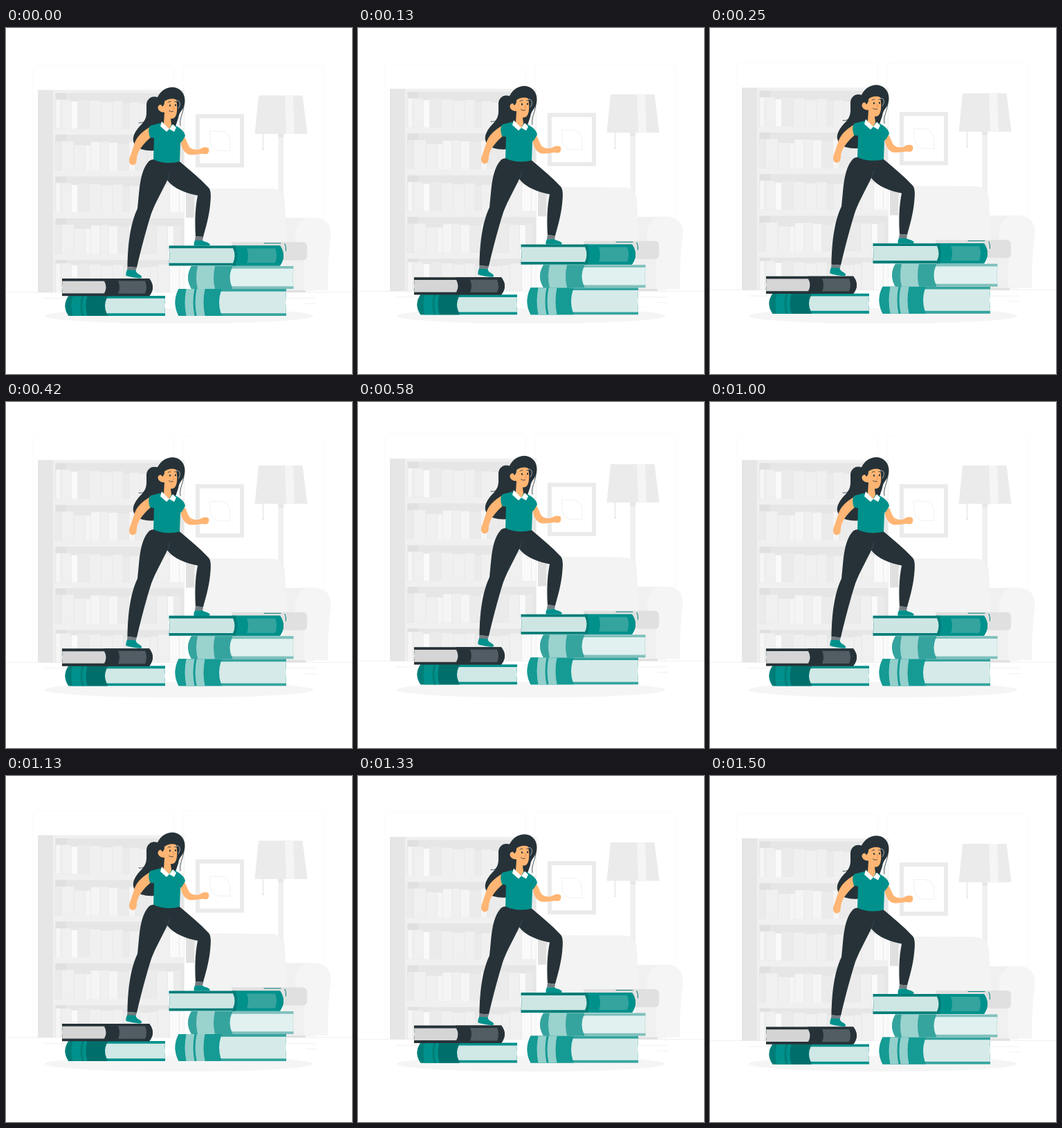
Write an HTML page that moves like this. It is 500 px wide and 500 px high and loops after 1540 ms.

```html
<!DOCTYPE html>
<html lang="en">
<head>
<meta charset="utf-8">
<title>Climbing the books</title>
<style>
html, body { margin: 0; width: 100%; height: 100%; overflow: hidden; background: #fff; }
svg { display: block; width: 100vw; height: 100vh; }
.line { fill: none; stroke-linecap: round; }
</style>
</head>
<body>
<svg viewBox="0 0 500 500">
  <ellipse cx="250" cy="416" rx="194" ry="11.3" fill="#f5f5f5"/>
  <g id="scene">
    <!-- wall and floor -->
    <g class="line" stroke="#fafafa">
      <rect x="39" y="54" width="203.5" height="328" rx="4"/>
      <rect x="255" y="54" width="203.5" height="328" rx="4"/>
      <path stroke="#f0f0f0" d="M0 382H500M56 390.5H84M408 390.5H446M433 398.5H448"/>
    </g>

    <g id="bookcase"></g>

    <!-- picture -->
    <path fill="#fff" stroke="#ebebeb" stroke-width="6" d="M277 127.5H341V198.5H277z"/>
    <path class="line" stroke="#f0f0f0" d="M295 149H309A15 15 0 0 1 324 164V177.5H310A15 15 0 0 1 295 162z"/>

    <!-- lamp -->
    <path fill="#f0f0f0" d="M393.5 153H401V280H393.5z"/>
    <path fill="#e6e6e6" d="M393.5 153H401V158H393.5z"/>
    <path fill="#ebebeb" d="M365 97.5H428.5L435.5 153H359.5z"/>
    <path fill="#f5f5f5" d="M403 97.5H415L417 153H405z"/>
    <path class="line" stroke="#e0e0e0" d="M371.5 153V174"/>
    <circle cx="371.5" cy="175" r="1.2" fill="#e0e0e0"/>

    <!-- sofa -->
    <path fill="#e0e0e0" d="M260 236H276V274H260z"/>
    <path fill="#f0f0f0" d="M400 274.5H445V380H400z"/>
    <path fill="#f3f3f3" d="M272 330V250Q273 231.5 292 231.5L384 232Q401 233 403 250L407 330z"/>
    <path fill="#f5f5f5" d="M418 310C416 286 424 274 444 274C462 274 471 285 469.5 301C466 327 465 350 465 379H431V310z"/>
    <path fill="#e0e0e0" d="M326 309.5H429Q435 310 435 316V329Q435 335 429 335.5H326zM400 379H433V382H400z"/>

    <g id="stacks"></g>
    <path class="line" stroke="#007d78" d="M373 311H397M403 312Q405 316 404.5 322"/>

    <!-- woman -->
    <g fill="#263238">
      <path d="M219 100C225 88 237 83.500 246 86.500C256 90 260 100 258 110C256 119 250 121 249 130L245 142L236 146L217 152L214 177C204 178 191 176 186 168C180 158 188 147 197 138C204 130 203 124 203 114C202 104 209 97 219 100z"/>
      <path class="line" stroke="#263238" stroke-width=".8" d="M203 133Q198 138 192 137M257 108C258 121 250 129 252 141"/>
    </g>
    <g fill="#ffb573">
      <path d="M252 162C253 172 257 181 265 183C273 184 281 181 286 182C292 183 294 180 293 174C290 171 284 172 280 175C274 177 269 175 266 173C262 168 261 161 258 158z"/>
      <path d="M208 143C196 150 188 158 185 169L180 184C177 190 177 196 182 198C188 198 189 194 189 187C191 176 199 167 210 157z"/>
      <path d="M227 108C231 101 243 98 246 104C248 114 248 126 243 130C241 131 240 131 238 131L239 141L236 146L228 138L229 122C222 122 218 117 220 113C222 110 225 110 227 114z"/>
    </g>
    <path fill="#263238" d="M225 113C223 103 231 97 240 97C246 97 249 101 250 106C244 100 234 102 229 106C229 110 228 113 225 113z"/>
    <path class="line" stroke="#263238" stroke-width=".8" d="M234 107.5Q236 105.500 238 106.500M243.500 106.500Q245 105.500 246.500 107M235.500 119.500Q238 122 241.500 120.500"/>
    <path class="line" stroke="#e58a55" stroke-width=".8" d="M241.500 113L243 117L241 117.500"/>
    <path class="line" stroke="#263238" stroke-width="2" d="M237 111.500V112.500M245 111V112"/>
    <path class="line" stroke="#fff" stroke-width=".6" d="M246 105C252 103 253 112 249 116"/>
    <path fill="#00918c" d="M209 141L225 137L245 141C252 145 258 149 259 156L255 163L252 166L251 194C238 197 224 196 213 191L214 159L208 158C206 151 205 145 209 141z"/>
    <path fill="#ffb573" d="M229 133L238 135L239 140L236 146L228 139z"/>
    <path fill="#fff" d="M225 135L236 146L232 150L223 142zM236 146L241 139L246 144L243 150z"/>
    <path fill="#263238" d="M213 190C225 196 240 196 251 193C265 205 280 217 293 231C297 236 296 246 295 256C293 275 288 290 285 302L274 301C273 280 273 262 277 242C262 239 243 233 233 220C227 233 216 252 210 268C203 290 195 320 189 346L175.500 345C176 320 178 286 190 261C193 238 192 208 207 192Q210 190 213 190z"/>
    <path class="line" stroke="#455a64" stroke-width=".6" d="M233 220Q236 215 237 209"/>
    <path fill="#737c80" d="M175.500 345L189 346L187.500 350.500L175 350zM274 301L285 302L284 307.500L273 307z"/>
    <path fill="#00918c" d="M175 349.500L187.500 350C188 354 191 355 194 357C198 360 196 362 192 361.500C186 361 179 360 173.500 358C173 355 174 352 175 349.500zM273 307L284 307C286 309 290 309 293 311C296 313 295 314.600 292 314.600H271.500Q271 310 273 307z"/>
  </g>
</svg>
<script>
const byId = id => document.getElementById(id);
const path = (d, fill) => `<path fill="${fill}" d="${d}"/>`;
const box = (x, y, right, bottom, fill) => path(`M${x} ${y}H${right}V${bottom}H${x}z`, fill);

function seeded(seed) {
  return () => (seed = seed * 16807 % 2147483647) / 2147483647;
}

// Books of random width and height, standing on one shelf
function shelfBooks(floor, seed) {
  const random = seeded(seed), tones = ['#fafafa', '#f5f5f5', '#ebebeb', '#f0f0f0'];
  let out = '';
  for (let x = 72; x < 252;) {
    const right = Math.min(x + 7 + 11 * random(), 257);
    const height = 42 - 6 * random() * (x > 94);
    out += box(x, floor - height, right, floor, tones[Math.floor(4 * random())]);
    x = right + 0.8;
  }
  return out;
}

function bookcase() {
  let out = box(46, 89.5, 68, 382, '#e6e6e6') + box(68, 89.5, 258, 382, '#f0f0f0');
  for (let row = 0; row < 5; row++) {
    const floor = 145.5 + row * 60.3, bottom = Math.min(floor, 382);
    out += box(71.5, floor - 51.5, 257, bottom, '#e6e6e6') +
      box(71.5, floor - 51.5, 87, bottom, '#e0e0e0') +
      shelfBooks(bottom, 4000 + row % 2 * 777);
  }
  return out;
}

// A lying book with its spine at x; flip puts the spine on the right
function book({ x, y, w, h, spine, cover, back = cover, page, bands, flip }) {
  const mid = h / 2, edge = 3.8;
  const strip = ([from, to, fill, inset = 0]) => path(
    `M${from} ${inset}H${to}Q${to - 4} ${mid} ${to} ${h - inset}H${from}Q${from - 4} ${mid} ${from} ${inset}z`, fill);
  return `<g transform="translate(${x} ${y}) scale(${flip ? -1 : 1} 1)">` +
    path(`M5 0H${w}V${edge}L${w - 1} ${mid}L${w} ${h - edge}V${h}H5Q-5 ${mid} 5 0z`, cover) +
    path(`M5 0H${spine + 4}V${h}H5Q-5 ${mid} 5 0z`, back) +
    bands.map(strip).join('') +
    path(`M${spine + 3} ${edge}H${w}Q${w - 2} ${mid} ${w} ${h - edge}H${spine + 3}Q${spine - 2} ${mid} ${spine + 3} ${edge}z`, page) +
    '</g>';
}

const teal = '#00918c', deep = '#007d78', soft = '#35a49e', pale = '#93cfcb', ink = '#263238';
const stacks = [
  { x: 244.5, y: 377, w: 160.5, h: 39, spine: 63, cover: soft, back: '#159a94', page: '#d6ebe9',
    bands: [[16, 28, pale], [31, 43, pale]] },
  { x: 263, y: 344, w: 152.5, h: 33, spine: 60, cover: '#7fc0bc', back: soft, page: '#e0f1f0',
    bands: [[14, 39, '#9ad2ce']] },
  { x: 401, y: 314.5, w: 165.5, h: 29, spine: 70, cover: deep, back: teal, page: '#cde6e4', flip: true,
    bands: [[69, 74, deep], [12, 53, soft, 4]] },
  { x: 85.5, y: 387, w: 144.5, h: 29, spine: 57, cover: teal, back: deep, page: '#d0e8e6',
    bands: [[11, 32, teal], [24, 27, deep], [32, 61, '#006f6b']] },
  { x: 212, y: 362, w: 131, h: 25.3, spine: 67, cover: ink, page: '#d5d5d5', flip: true,
    bands: [[11, 50, '#525c63', 3.5]] }
];

byId('bookcase').innerHTML = bookcase();
byId('stacks').innerHTML = stacks.map(book).join('');

// The whole scene rises and sinks at constant speed above a still shadow
const period = 1540, lead = 52, rise = 10.3;

function draw() {
  const phase = (performance.now() + lead) % period / period;
  const lift = 1 - Math.abs(1 - 2 * phase);
  byId('scene').setAttribute('transform', `translate(0 ${(0.7 - rise * lift).toFixed(3)})`);
  requestAnimationFrame(draw);
}
draw();
</script>
</body>
</html>
```
